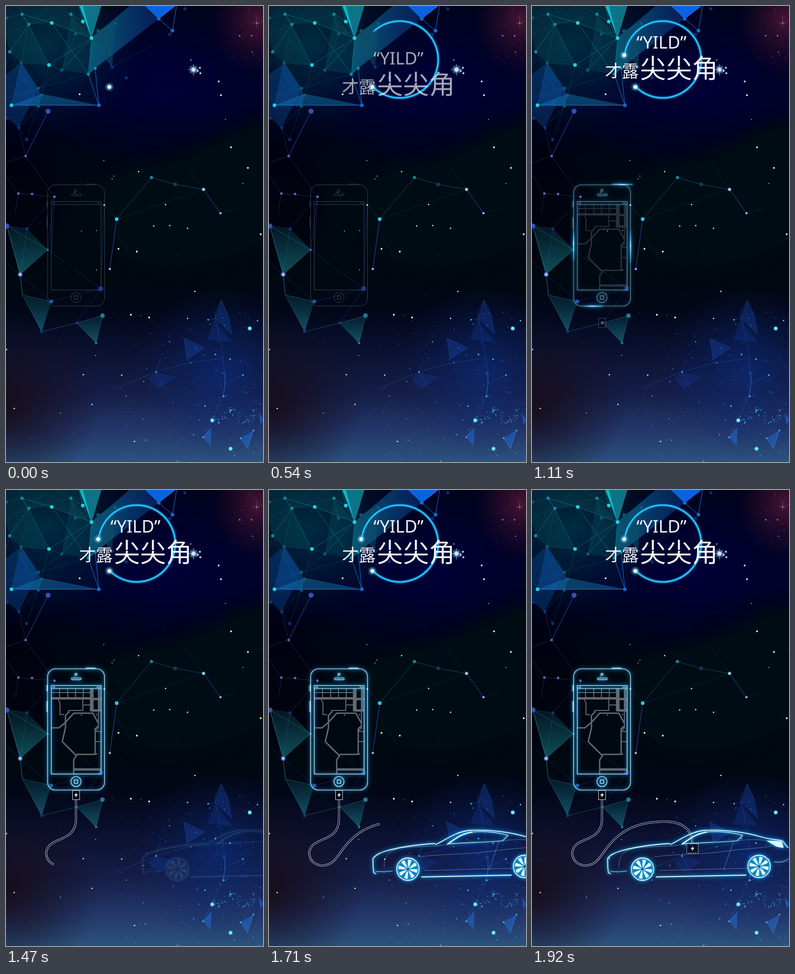
Animation, 562 px wide and 997 px high, one loop 1950 ms. Source, as an HTML page:

```html
<!DOCTYPE html>
<html lang="zh">
<head>
<meta charset="utf-8">
<title>Night drive</title>
<style>
html, body { margin: 0; height: 100%; overflow: hidden; background: #00040f; }
svg { display: block; width: 100vw; height: 100vh; }
path { fill: none; }
.poly path { stroke: none; }
.dots { stroke-linecap: round; }
.soft { filter: blur(14px); }

.arc, .title, .lit, .streak, .plug, .cable, .car, .socket, .end {
  animation: 1950ms linear infinite;
}
.arc { animation-name: sweep; stroke-dasharray: 308 900; opacity: .42; }
@keyframes sweep {
  0% { stroke-dashoffset: calc(308px + var(--k)); }
  31.8%, 100% { stroke-dashoffset: 0px; }
}
.end { animation-name: end; }
@keyframes end { 0%, 30.5% { opacity: 0; } 33.8%, 100% { opacity: 1; } }

.title { animation-name: rise; fill: #f2f6f8; }
@keyframes rise {
  0%, 18.46% { transform: translateY(88px); opacity: 0; }
  27.69% { transform: translateY(35px); opacity: .69; }
  33.85%, 100% { transform: translateY(0); opacity: 1; }
}
.latin { font: 500 38px "Noto Sans", "Open Sans", sans-serif; }
.han { font-family: "Noto Sans CJK SC", "Noto Sans CJK", sans-serif; font-weight: 100; }

.lit { animation-name: lit; }
@keyframes lit { 0%, 46.15% { opacity: 0; } 72.3%, 100% { opacity: 1; } }
.glow { filter: drop-shadow(0 0 2px #19b4f0) drop-shadow(0 0 5px #0a8fd8); }

.streak { animation-name: streak; }
@keyframes streak {
  0%, 46.15% { transform: translate(0, 0); opacity: 0; }
  51%, 60% { opacity: 1; }
  66.15%, 100% { transform: translate(var(--dx, 0), var(--dy, 0)); opacity: 0; }
}
.plug { animation-name: plug; }
@keyframes plug {
  0%, 50.26% { transform: translateY(37px); opacity: 0; }
  72.3%, 100% { transform: translateY(0); opacity: 1; }
}
.cable { animation-name: cable; stroke-dasharray: 1000 1100; }
@keyframes cable {
  0%, 62.5% { stroke-dashoffset: 1001px; }
  97.4%, 100% { stroke-dashoffset: 0px; }
}
.car { animation-name: drive; }
@keyframes drive {
  0%, 73.3% { transform: translateX(145px); opacity: 0; }
  75.4% { opacity: .12; }
  87% { opacity: 1; }
  100% { transform: translateX(-9px); opacity: 1; }
}
.socket { animation-name: socket; }
@keyframes socket { 0%, 92% { opacity: 0; } 96.5%, 100% { opacity: 1; } }
</style>
</head>
<body>
<svg viewBox="0 0 562 997" preserveAspectRatio="none">
<defs>
  <linearGradient id="sky" x2="0" y2="1">
    <stop offset="0" stop-color="#000318"/><stop offset=".2" stop-color="#000324"/>
    <stop offset=".3" stop-color="#000316"/><stop offset=".4" stop-color="#000912"/>
    <stop offset=".6" stop-color="#000810"/><stop offset=".67" stop-color="#030719"/>
    <stop offset=".75" stop-color="#0a102e"/><stop offset=".85" stop-color="#151e47"/>
    <stop offset=".93" stop-color="#23376a"/><stop offset="1" stop-color="#2c527c"/>
  </linearGradient>
  <radialGradient id="navy"><stop stop-color="#000038"/><stop offset="1" stop-color="#000030" stop-opacity="0"/></radialGradient>
  <radialGradient id="plum"><stop stop-color="#451434"/><stop offset="1" stop-color="#2a0a2a" stop-opacity="0"/></radialGradient>
  <radialGradient id="dusk"><stop stop-color="#170d1a"/><stop offset="1" stop-color="#150c1c" stop-opacity="0"/></radialGradient>
  <radialGradient id="haze"><stop stop-color="#0b2f86" stop-opacity=".6"/><stop offset="1" stop-color="#0a2468" stop-opacity="0"/></radialGradient>
  <radialGradient id="teal"><stop stop-color="#004858" stop-opacity=".6"/><stop offset="1" stop-color="#003048" stop-opacity="0"/></radialGradient>
  <radialGradient id="spark"><stop stop-color="#fff"/><stop offset=".3" stop-color="#eaffff"/><stop offset=".45" stop-color="#8fd8e8" stop-opacity=".55"/><stop offset="1" stop-color="#2090c0" stop-opacity="0"/></radialGradient>
  <linearGradient id="beam"><stop stop-color="#0b6f88" stop-opacity=".75"/><stop offset="1" stop-color="#0a3a90" stop-opacity=".5"/></linearGradient>
  <linearGradient id="fin" x2="0" y2="1"><stop stop-color="#12808c" stop-opacity=".15"/><stop offset="1" stop-color="#1c8a98" stop-opacity=".55"/></linearGradient>
  <linearGradient id="sh"><stop stop-color="#3cf" stop-opacity=".1"/><stop offset=".5" stop-color="#e8ffff"/><stop offset="1" stop-color="#3cf" stop-opacity=".5"/></linearGradient>
  <linearGradient id="sv" x2="0" y2="1"><stop stop-color="#3cf" stop-opacity=".1"/><stop offset=".5" stop-color="#c8fbff"/><stop offset="1" stop-color="#3cf" stop-opacity=".3"/></linearGradient>

  <path id="ring" pathLength="308" d="M226.6 176.4A84 84 0 1 0 202.6 107.2"/>
  <path id="wire" pathLength="1000" d="M153 677V720C153 774 88 756 88 795C89 812 103 821 117 821C150 820 150 788 188 757C215 734 250 725 290 725C328 725 350 741 350.5 773"/>
  <mask id="tube" maskUnits="userSpaceOnUse" x="0" y="600" width="562" height="300">
    <use href="#wire" stroke="#fff" stroke-width="4.4"/><use href="#wire" stroke="#000" stroke-width="2.4"/>
  </mask>
  <path id="bolt" style="fill:#fff" d="M1.5 -5.5L-4 1H-.5L-1.5 5.5L4 -1.5H.5Z"/>
  <g id="phone" fill="none">
    <rect x="91" y="391" width="124.5" height="265" rx="17"/>
    <rect x="99" y="427.5" width="109" height="193.5"/>
    <path d="M99 434H208M174 391L176 389.3H194L197 391M91 427H89.5V439H91M91 462H89.5V472H91M91 473.5H89.5V484.5H91M102 432V431M104 432V430.5M106 432V430M198 431H206"/>
    <circle cx="153" cy="403" r="2.2"/>
    <rect x="143" y="411" width="21.5" height="3.6" rx="1.8"/>
    <circle cx="153" cy="637.5" r="11"/>
    <rect x="149.3" y="633.8" width="7.5" height="7.5"/>
  </g>
  <g id="wheel">
    <circle r="24.5" fill="#0a5c90" fill-opacity=".25" stroke="#fff" stroke-width="1.8"/>
    <circle r="21.5" fill="none" stroke="#35c0ea" stroke-width=".7"/>
    <g id="spokes" stroke="none"></g>
    <circle r="4" fill="#0a5c90" stroke="#fff" stroke-width="1.2"/>
  </g>
</defs>

<rect width="562" height="997" fill="url(#sky)"/>
<ellipse cx="350" cy="170" rx="300" ry="200" fill="url(#navy)"/>
<path class="soft" style="fill:#000c14" d="M580 246C480 254 430 325 300 345C200 362 190 420 230 520C280 600 440 590 580 510Z"/>
<ellipse cx="0" cy="430" rx="120" ry="130" fill="#02000e" opacity=".6" class="soft"/>
<ellipse cx="552" cy="30" rx="105" ry="125" fill="url(#plum)"/>
<ellipse cx="0" cy="870" rx="210" ry="190" fill="url(#dusk)"/>
<ellipse cx="470" cy="800" rx="190" ry="190" fill="url(#haze)"/>
<ellipse cx="90" cy="80" rx="210" ry="200" fill="url(#teal)"/>
<g id="specks"></g>

<g class="poly">
  <path style="fill:url(#beam)" d="M187 70L270 0H305L334 28L195 136L180 149Z"/>
  <path style="fill:#0b62e0" d="M305 0H370L334 28Z"/>
  <path style="fill:#0d4f6a;opacity:.55" d="M187 70L201 54L239 38L232 134Z"/>
  <path style="fill:#14a8b8;opacity:.65" d="M162 0H208L187 70Z"/>
  <path style="fill:#10d8e8;opacity:.7" d="M160 0H168L187 70Z"/>
  <path style="fill:#0a5560;opacity:.3" d="M0 0H160L187 70L100 37L50 40L8 100L0 70Z"/>
  <path style="fill:#0a6068;opacity:.25" d="M50 40L94 129L33 124L8 100ZM142 18L187 70L180 149L122 140Z"/>
  <path style="fill:#0e62b8;opacity:.38" d="M33 124L78 195L71 219L12 217Z"/>
  <path style="fill:#0c4a90;opacity:.4" d="M0 150L33 124L71 180L28 266L0 240Z"/>
  <path style="fill:#1478b0;opacity:.45" d="M12 217L78 192L203 217Z"/>
  <path style="fill:url(#fin)" d="M2 481L46 487L91 533L31 587Z"/>
  <path style="fill:url(#fin)" d="M36 632L99 646L78 712Z"/>
  <path style="fill:url(#fin)" d="M155 693L211 677L197 737Z"/>
  <path style="fill:#1848b0;opacity:.35" d="M471 643L456 684L495 720L488 680ZM389 726L434 748L396 772Z"/>
  <path style="fill:#1440a8;opacity:.25" d="M328 800L372 812L332 838L310 815ZM456 684L495 735L440 730Z"/>
  <path style="fill:#2468d0;opacity:.55" d="M431 943L449 922L448 963ZM513 945L541 928L528 968ZM553 890L564 905L556 916Z"/>
</g>

<g stroke-width=".7">
  <path stroke="#18a0b0" opacity=".75" d="M100 37L187 70L168 34L160 0M187 70L94 129M187 70L180 149L100 37L35 18L50 40L8 100M142 18L168 34M187 70L208 0M187 70L122 140"/>
  <path stroke="#1484a0" opacity=".4" d="M0 26L35 18L30 0M50 40L33 124L8 100L0 130M50 40L94 0M50 40L94 129L33 124L71 180L122 140L94 129L78 195M152 61L201 54L239 38M152 61L142 18L110 0M33 124L12 217M71 180L71 219L28 266L3 245M28 266L45 292L78 195M8 100L71 219M35 18L94 129M0 60L50 40L142 18M232 134L187 70M122 140L152 61M0 200L71 180L180 149M232 134L320 85"/>
  <path stroke="#1a7ae0" stroke-width="1" d="M180 149L195 136L203 217ZM334 28L364 54L373 0M305 0L334 28L370 0M12 217H203"/>
  <path stroke="#3a48b8" stroke-width="1" d="M92 230L43 328M242 466L227 575M432 401L469 453"/>
  <path stroke="#2a6aa0" opacity=".55" d="M28 266L43 328L106 417L27 410L0 370M27 410L20 455M43 328L0 343M106 417L46 487L2 481M46 487L31 587M215 435L242 466"/>
  <path stroke="#1c8090" opacity=".85" d="M2 481L91 533L31 587M242 466L318 375L370 390L432 401M36 632L78 712L155 693L211 677L197 737L155 693M36 632L99 646"/>
  <path stroke="#2bb0c8" d="M2 481L31 587L36 632"/>
  <path stroke="#2038a0" opacity=".8" d="M99 646L207 618L155 693M106 417L91 533L207 618L215 435M0 560L31 587L99 646M106 417L99 540"/>
  <path stroke="#20507a" opacity=".45" d="M242 466L432 401L390 343M469 453L505 443M242 498L281 557"/>
  <path stroke="#2858b8" opacity=".7" d="M471 643L456 670L475 770L479 825L476 853L462 858M456 684L471 643L488 680M389 726L434 748L396 772ZM328 800L338 770M328 800L400 780L475 770M479 825L518 807M476 853L450 906L431 943M240 836L328 800L350 840M456 684L442 686M513 945L553 890"/>
  <path stroke="#38a8e8" opacity=".7" d="M479 800V825L474 856L486 850M431 943L449 922M541 928L528 968L513 945"/>
</g>

<g class="dots">
  <path stroke="#1fd0e0" stroke-width="8" d="M100 37h0M187 70h0M94 129h0M168 34h0M12 217h0M242 466h0"/>
  <path stroke="#1585a0" stroke-width="7" d="M35 18h0M50 40h0M8 100h0M142 18h0M180 149h0M195 136h0M318 375h0"/>
  <path stroke="#126078" stroke-width="7" opacity=".8" d="M122 140h0M152 61h0M201 54h0M239 38h0M78 195h0M71 180h0M71 219h0M33 124h0M1 26h0"/>
  <path stroke="#1668c8" stroke-width="8" d="M203 217h0M334 28h0M364 54h0"/>
  <path stroke="#173a90" stroke-width="7" opacity=".7" d="M232 134h0M28 266h0M3 245h0M45 292h0M391 6h0M358 62h0M263 157h0M46 487h0M78 712h0M155 693h0"/>
  <path stroke="#3550b8" stroke-width="11" d="M92 230h0M2 481h0"/>
  <path stroke="#1c3488" stroke-width="11" d="M207 618h0"/>
  <path stroke="#5a6ac0" stroke-width="5.5" d="M43 328h0M106 417h0M27 410h0M227 575h0M469 453h0M57 411h0"/>
  <path stroke="#2458b0" stroke-width="8" d="M99 646h0"/>
  <path stroke="#1c7a94" stroke-width="10" d="M211 677h0"/>
  <path stroke="#123c58" stroke-width="8" d="M370 390h0"/>
  <path stroke="#5a80d0" stroke-width="10" d="M31 587h0"/>
  <path stroke="#5a98b0" stroke-width="7.5" d="M432 401h0"/>
  <path stroke="#2a7890" stroke-width="5" d="M91 533h0M197 737h0"/>
  <path stroke="#e8f6ff" stroke-width="4" d="M31 587h0M432 401h0M215 435h0M161 193h0M465 165h0M470 195h0M492 309h0M529 354h0M246 531h0M286 537h0M557 499h0M273 675h0M313 681h0"/>
  <path stroke="#dcecff" stroke-width="3.2" d="M290 362h0M349 434h0M323 481h0M358 480h0M397 486h0M413 624h0M397 683h0M253 807h0M169 806h0M188 871h0M18 880h0M1 751h0M281 952h0M469 453h0M227 575h0"/>
  <path stroke="#a8c0dc" stroke-width="2.6" opacity=".75" d="M119 890h0M263 853h0M301 821h0M404 780h0M214 338h0M232 378h0M236 372h0M198 491h0M198 577h0M165 492h0M480 248h0M539 101h0M196 764h0M518 388h0M150 407h0"/>
  <path stroke="#48c8f0" stroke-width="3.5" d="M458 762h0M518 807h0M490 772h0M550 688h0M328 800h0M435 875h0M476 853h0M491 884h0M442 686h0M513 945h0M541 928h0M431 943h0"/>
  <path stroke="#1c90c8" stroke-width="11" opacity=".4" d="M533 705h0M451 906h0M491 968h0"/>
  <path stroke="#7ceaff" stroke-width="7.5" d="M533 705h0M451 906h0M491 968h0"/>
</g>

<g stroke="#9cc8f0" opacity=".9">
  <path d="M410 127V152M398 139H422M403 132L417 146M417 132L403 146"/>
  <path stroke-width=".7" opacity=".6" d="M548 29V45M540 37H556"/>
  <circle cx="410" cy="139" r="12" fill="url(#spark)" stroke="none"/>
  <path class="dots" stroke="#c8e4f4" stroke-width="4.5" d="M424 135h0M419 142h0M425 147h0"/>
  <path class="dots" stroke="#a890b0" stroke-width="3.5" d="M548 37h0M404 118h0M511 65h0M537 65h0"/>
</g>

<g id="halo"></g>
<circle cx="226" cy="177" r="11" fill="url(#spark)"/>
<circle class="end" cx="201.5" cy="107.5" r="11" fill="url(#spark)"/>

<g class="title">
  <text class="latin" x="283" y="93" text-anchor="middle">“YILD”</text>
  <text class="han" x="159.5" y="156" font-size="37">才露</text>
  <text class="han" x="236" y="157" font-size="57">尖尖角</text>
</g>

<use href="#phone" stroke="#59636c" stroke-width=".8" opacity=".85"/>
<g class="lit">
  <g stroke="#8b9097" opacity=".72">
    <path stroke-width="2" d="M99 443H184M117 434V455M135 434V455M152 434V455M169 434V455M114 458L118 465V491H127M137 482H168V458M168 470H184M202 482V520L195 528V550H208M195 528H208"/>
    <path stroke-width="3" d="M99 520H116L130 508V493L137 486V482M130 508V520L123 550L154 581L148 590V621M154 578H195V522L202 516M130 508L148 488H190L202 510"/>
    <path stroke-width="5" d="M99 455.5H184M148 611H208M203.5 434V482M187 457H208M187 482H208"/>
    <path stroke-width="8" d="M187.5 434V484"/>
  </g>
  <use class="glow" href="#phone" stroke="#eafcff" stroke-width="1.15"/>
</g>
<g class="glow">
  <rect class="streak" style="--dx:-121px" x="240" y="389.3" width="46" height="2" fill="url(#sh)"/>
  <rect class="streak" style="--dx:137px" x="33" y="655.3" width="48" height="2" fill="url(#sh)"/>
  <rect class="streak" style="--dy:325px" x="214.5" y="312" width="2" height="73" fill="url(#sv)"/>
  <rect class="streak" style="--dy:-388px" x="90" y="694" width="2" height="73" fill="url(#sv)"/>
</g>

<g class="plug">
  <rect x="145.5" y="657" width="15.5" height="20" fill="#04081a" fill-opacity=".7" stroke="#e8eef2"/>
  <use href="#bolt" x="153.2" y="667"/>
</g>

<g class="car">
  <g class="glow" stroke="#f2feff" stroke-linecap="round" stroke-linejoin="round">
    <path stroke-width="1.8" d="M172 839L167.5 837L166 825L165.5 806C172 797 182 793 195 789C230 779 268 775 301 773M303 775C325 765 345 748 375 744.5C420 741 470 749 500 758C520 764 536 764 548 767L560 782"/>
    <path stroke-width="2.6" d="M329 774C345 763 357 752 382 748"/>
    <path stroke-width="1.2" d="M382 748C410 745 440 749 461 755L449 767C415 770 370 771 329 774"/>
    <path stroke-width="2.2" d="M272 846L468 842"/>
    <path stroke-width=".8" d="M172 834Q190 836 208 833M530 813Q550 816 561 807"/>
    <path style="fill:#dffaff" d="M515 767L546 768.5L550 782L535 779Z"/>
    <use href="#wheel" x="242" y="829"/>
    <use href="#wheel" x="497" y="823"/>
  </g>
  <path stroke="#a8d4e4" stroke-width=".7" opacity=".75" d="M268 802C320 795 380 797 430 789C475 783 505 783 525 778M278 832L470 827M441 768L419 832M190 826C190 802 198 790 224 783C260 778 300 781 329 775M449 767C480 763 500 764 515 767"/>
</g>

<g mask="url(#tube)"><use class="cable" href="#wire" stroke="#c9d0d8" stroke-width="5"/></g>

<g class="socket">
  <rect x="338.5" y="773.5" width="25" height="20.5" fill="#050a1c" fill-opacity=".7" stroke="#fff" stroke-dasharray="3 2"/>
  <use href="#bolt" x="351" y="784"/>
</g>
</svg>

<script>
const NS = "http://www.w3.org/2000/svg";
const add = (parent, tag, attrs) => {
  const el = document.createElementNS(NS, tag);
  for (const k in attrs) el.setAttribute(k, attrs[k]);
  document.getElementById(parent).appendChild(el);
};
let seed = 11;
const rnd = () => (seed = (seed * 16807) % 2147483647) / 2147483647;
const dot = (cx, cy, r, fill, opacity) => add("specks", "circle", { cx, cy, r, fill, opacity });

// Stacked strokes with a closing lag give the ring its fading tip
for (const [width, color] of [[9, "#0a50a0"], [4.5, "#0a90d0"], [2, "#30e0f8"]])
  for (let i = 0; i < 4; i++)
    add("halo", "use", {
      href: "#ring", class: "arc", stroke: color, "stroke-width": width,
      style: `--k:${i * 14}px` + (width > 8 ? ";opacity:.12" : "")
    });

for (let a = 0; a < 360; a += 45)
  add("spokes", "path", { d: "M-1.5 -6L-4 -20Q0 -22 4 -20L1.5 -6Z", transform: `rotate(${a + 12})`, style: "fill:#e8fdff" });

// Dust, densest towards the lower right
for (let i = 0; i < 330; i++) {
  const x = 562 - 330 * rnd() ** 1.25, y = 997 - 330 * rnd() ** 1.2;
  dot(x, y, .5 + rnd() ** 3 * 1.3, rnd() < .25 ? "#3cb4ee" : "#2a62c8", .3 + .6 * rnd());
}
for (let i = 0; i < 70; i++) {
  const s = rnd() * 6;
  dot(440 + 16 * s + 14 * rnd(), 888 + 14 * Math.sin(s * 1.7) + 16 * rnd(), .6 + rnd() * .8, "#3aa8f0", .8);
}
for (let i = 0; i < 90; i++) dot(562 * rnd(), 670 + 327 * rnd(), .5 + .6 * rnd(), "#7088b8", .4 * rnd());
for (let i = 0; i < 40; i++) dot(130 + 432 * rnd(), 300 + 350 * rnd(), .5 + .6 * rnd(), "#607890", .5 * rnd());
for (let i = 0; i < 35; i++) dot(562 - 70 * rnd() ** 1.4, 120 * rnd(), .5 + .6 * rnd(), "#a070a0", .7 * rnd());
</script>
</body>
</html>
```
